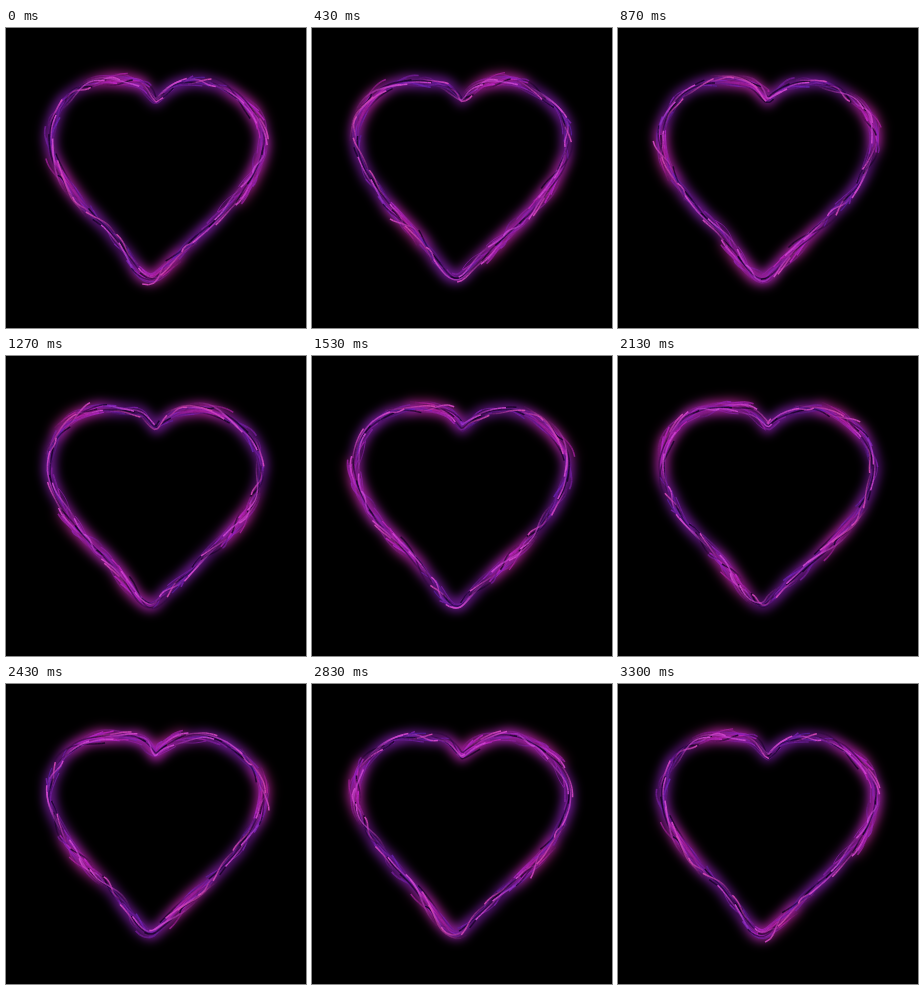
An HTML page with a canvas that plays this animation: 300x300 px, repeating every 3330 ms.

```html
<!DOCTYPE html>
<html lang="en">
<head>
<meta charset="utf-8">
<title>Flowing heart</title>
<style>
  html, body { margin: 0; width: 100%; height: 100%; overflow: hidden; background: #000; }
  canvas { display: block; width: 300px; height: 300px; }
  svg { position: absolute; width: 0; height: 0; }
</style>
</head>
<body>
<canvas id="stage" width="300" height="300"></canvas>
<svg><path id="heart" d="M150 72C163 58 178 53 196 53S256 78 256 110S230 172 203 197S164 234 150 247S117 215 97 197S44 142 44 110S68 53 104 53S137 58 150 72"/></svg>
<script>
const SIZE = 300, LOOP = 3330, STEPS = 100, SAMPLES = 720;
const ctx = document.getElementById('stage').getContext('2d');
const glowCanvas = document.createElement('canvas');
glowCanvas.width = glowCanvas.height = SIZE;
const glow = glowCanvas.getContext('2d');

// Evenly spaced outline points with smoothed outward normals.
const heart = document.getElementById('heart');
const total = heart.getTotalLength();
const wrap = v => v - Math.floor(v);
const at = u => heart.getPointAtLength(wrap(u) * total);
const outline = Array.from({ length: SAMPLES }, (_, i) => {
  const u = i / SAMPLES, p = at(u), a = at(u - 0.012), b = at(u + 0.012);
  const dx = b.x - a.x, dy = b.y - a.y, len = Math.hypot(dx, dy) || 1;
  return { x: p.x, y: p.y, nx: dy / len, ny: -dx / len };
});

function place(u, offset) {
  const p = outline[Math.floor(wrap(u) * SAMPLES)];
  return [p.x + p.nx * offset, p.y + p.ny * offset];
}

let seed = 41;
function random() {
  seed = (seed * 16807) % 2147483647;
  return seed / 2147483647;
}
const between = (low, high) => low + random() * (high - low);
const spread = r => between(-r, r);

// Bundles that bulge outward and burn pinker than the rest of the stream.
const CLUMPS = [0.17, 0.29, 0.48, 0.71, 0.92];
function clumpiness(u) {
  const near = Math.min(...CLUMPS.map(c => Math.abs(wrap(u - c + 0.5) - 0.5)));
  return Math.exp(-((near / 0.035) ** 2));
}

function makeStrand(head, style) {
  const length = between(0.035, 0.1);
  const heat = clumpiness(head - length / 2);
  const reach = 4 + 2 * heat;
  return {
    head, length, heat,
    from: 2 * heat + spread(reach),
    to: 2 * heat + spread(reach),
    bend: spread(3), waves: between(1, 2),
    ...style(heat)
  };
}
const scatter = (count, style) => Array.from({ length: count }, (_, i) =>
  makeStrand(i / count + spread(0.02), style));

const violet = heat => ({
  color: `hsl(${between(262, 288) + 22 * heat} 68% ${between(34, 44) + 7 * heat}%)`,
  width: between(0.9, 1.8), alpha: 0.72
});
const shadow = () => ({ color: '#10031f', width: 1.5, alpha: 0.8 });
const spark = () => ({ color: `hsl(${between(294, 316)} 60% 55%)`, width: 1.5, alpha: 0.95 });

const body = [
  ...scatter(80, violet),
  ...CLUMPS.flatMap(c => Array.from({ length: 8 }, () => makeStrand(c + between(0, 0.07), violet)))
];
const strands = [...body, ...scatter(24, shadow), ...scatter(34, spark)];

function strandPoints(s, phase) {
  const count = Math.max(6, Math.ceil(s.length * 160));
  return Array.from({ length: count + 1 }, (_, i) => {
    const k = i / count;
    const offset = s.from + (s.to - s.from) * k + Math.sin(k * Math.PI * s.waves) * s.bend;
    return place(s.head - s.length * (1 - k) + phase, offset);
  });
}

function trace(c, points) {
  c.beginPath();
  points.forEach(([x, y]) => c.lineTo(x, y));
}

function drawGlow(lines) {
  glow.globalCompositeOperation = 'source-over';
  glow.fillStyle = '#000';
  glow.fillRect(0, 0, SIZE, SIZE);
  glow.globalCompositeOperation = 'lighter';
  glow.lineCap = glow.lineJoin = 'round';
  glow.strokeStyle = 'rgb(48,8,66)';
  glow.lineWidth = 12;
  trace(glow, outline.map(p => [p.x, p.y]));
  glow.closePath();
  glow.stroke();
  glow.lineWidth = 13;
  body.forEach((s, i) => {
    glow.strokeStyle = `rgb(${7 + 4 * s.heat},2,${9 - 2 * s.heat})`;
    trace(glow, lines[i]);
    glow.stroke();
  });
  ctx.filter = 'blur(5px)';
  ctx.drawImage(glowCanvas, 0, 0);
  ctx.filter = 'none';
}

// Each strand fades from a bright head to an invisible tail.
function drawStrand(s, points) {
  ctx.strokeStyle = s.color;
  ctx.lineWidth = s.width;
  for (let i = 1; i < points.length; i++) {
    const k = i / (points.length - 1);
    ctx.globalAlpha = s.alpha * k;
    trace(ctx, [points[i - 1], points[i]]);
    ctx.stroke();
  }
}

function draw(phase) {
  const lines = strands.map(s => strandPoints(s, phase));
  ctx.globalAlpha = 1;
  ctx.fillStyle = '#000';
  ctx.fillRect(0, 0, SIZE, SIZE);
  drawGlow(lines);
  strands.forEach((s, i) => drawStrand(s, lines[i]));
}

let shown = -1;
const start = performance.now();
function tick() {
  const time = (performance.now() - start) % LOOP;
  const step = Math.min(STEPS - 1, Math.floor((time + 3.5) * 3 / STEPS));
  if (step !== shown) {
    shown = step;
    draw(step / STEPS);
  }
  requestAnimationFrame(tick);
}
tick();
</script>
</body>
</html>
```
